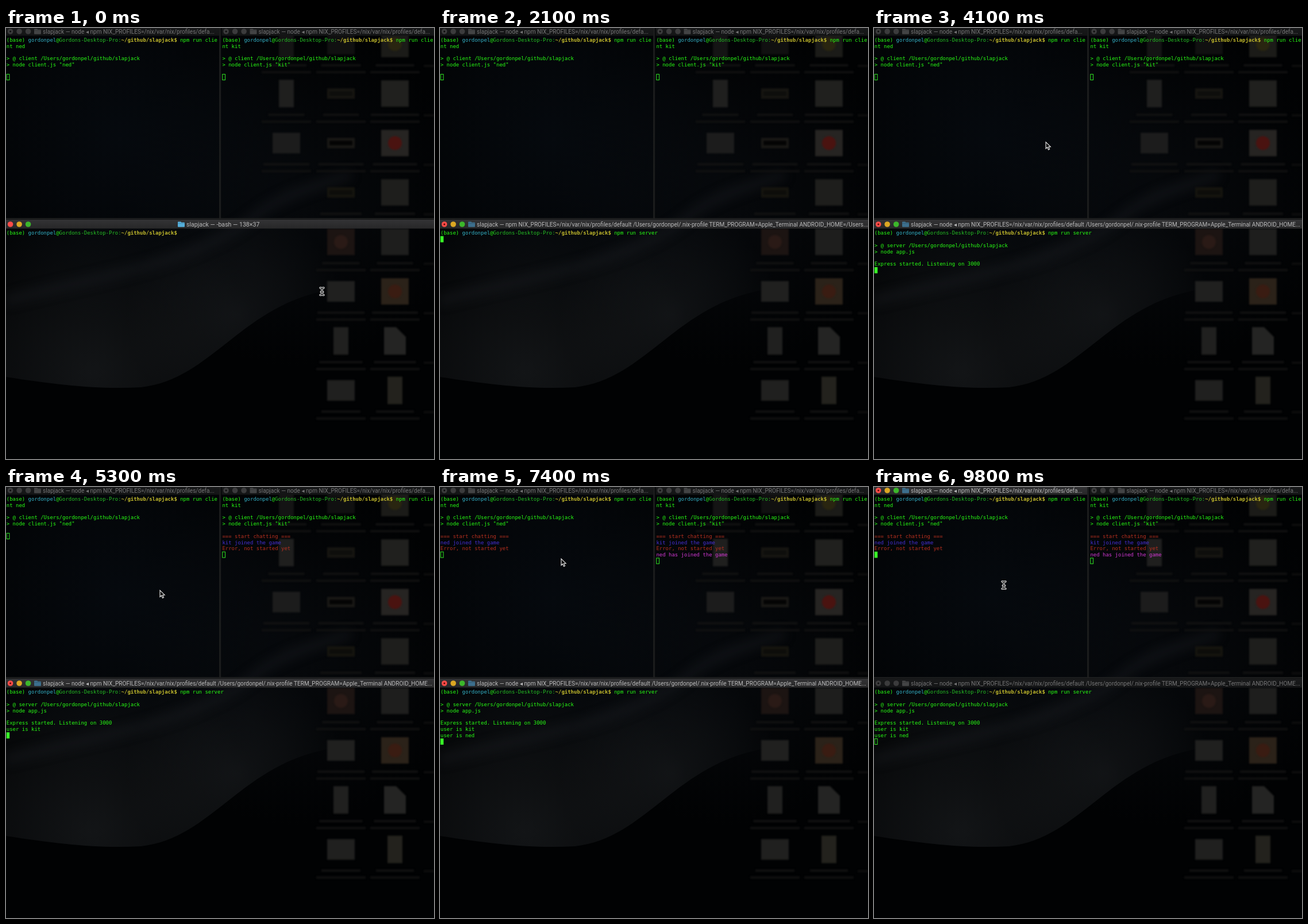
These frames come from a looping animation (745 px wide and 751 px high, 10 s). An HTML page with a canvas:

```html
<!DOCTYPE html>
<html lang="en">
<head>
<meta charset="utf-8">
<title>slapjack</title>
<style>
html, body { margin: 0; width: 100%; height: 100%; overflow: hidden; background: #010203; }
canvas { display: block; width: 745px; height: 751px; }
</style>
</head>
<body>
<canvas id="stage" width="745" height="751"></canvas>
<script>
const W = 745, H = 751, LOOP = 10000;
const ctx = document.getElementById('stage').getContext('2d');

const MONO = '"DejaVu Sans Mono", monospace';
const SANS = 'Roboto, "DejaVu Sans", sans-serif';
const SIZE = 8.97, CELL = 5.4, LINE = 10.8;
const C = {
  text: '#28fe14', cursor: '#38fe27', red: '#b8301f', blue: '#452fd2',
  pink: '#d338d3', cyan: '#33b0c4', green: '#25bc24', yellow: '#c3bb2c'
};

// When things happen, in ms
const TYPE = 1000, ENTER = 2000, NODE = 2300, LISTEN = 2600;
const RIGHT_JOIN = 4200, LEFT_JOIN = 7300, FOCUS = 7500;

const USER = 'gordonpel', HOST = 'Gordons-Desktop-Pro';
const LEFT = 'ned', RIGHT = 'kit';
const COMMAND = 'npm run server';
const PROFILES = 'npm NIX_PROFILES=/nix/var/nix/profiles/';
const CLIENT_TITLE = `slapjack — node ◂ ${PROFILES}defa...`;
const ENV = `${PROFILES}default /Users/${USER}/.nix-profile TERM_PROGRAM=Apple_Terminal ANDROID_HOME`;

function rect(g, x, y, w, h, fill) {
  g.fillStyle = fill;
  g.fillRect(x, y, w, h);
}

function disc(g, x, y, r, fill) {
  g.fillStyle = fill;
  g.beginPath();
  g.arc(x, y, r, 0, Math.PI * 2);
  g.fill();
}

function glow(g, x, y, r, rgb, alpha) {
  const fill = g.createRadialGradient(x, y, 0, x, y, r);
  fill.addColorStop(0, `rgba(${rgb},${alpha})`);
  fill.addColorStop(0.5, `rgba(${rgb},${alpha * 0.55})`);
  fill.addColorStop(1, `rgba(${rgb},0)`);
  rect(g, 0, 0, W, H, fill);
}

function dunes(g) {
  rect(g, 0, 0, W, H, '#010203');
  glow(g, 200, 190, 330, '12,20,30', 0.4);
  glow(g, 500, 290, 300, '14,18,24', 0.4);

  g.save();
  g.beginPath();
  g.moveTo(0, 608);
  g.bezierCurveTo(90, 622, 160, 630, 235, 626);
  g.bezierCurveTo(360, 612, 410, 480, 570, 455);
  g.lineTo(W, 425);
  g.lineTo(W, 350);
  g.lineTo(0, 350);
  g.clip();
  glow(g, 150, 600, 300, '36,39,42', 0.5);
  glow(g, 400, 500, 190, '34,37,40', 0.45);
  g.restore();

  g.save();
  g.filter = 'blur(9px)';
  g.strokeStyle = 'rgba(30,34,38,0.4)';
  g.lineWidth = 16;
  g.beginPath();
  g.moveTo(0, 475);
  g.bezierCurveTo(170, 430, 330, 410, 430, 330);
  g.bezierCurveTo(480, 290, 530, 280, 600, 255);
  g.stroke();
  g.restore();
}

// Icon shapes: width, height
const BOX = [48, 46], WIDE = [48, 36], TALL = [26, 48], STRIP = [48, 18], SHEET = [38, 48];

// column x, rows from the top: shape, colour, centre colour
const FILES = {
  488: [[TALL, '#141414'], [TALL, '#1f1f1e'], [WIDE, '#1c1c1c']],
  583: [
    [WIDE, '#101010'], [STRIP, '#171612', '#0e0e0c'], [STRIP, '#1a1916', '#040404'],
    [STRIP, '#16150f', '#0d0d0a'], [BOX, '#1c1412', '#2a1a16'], [WIDE, '#20201f'],
    [TALL, '#20201f'], [WIDE, '#20201f']
  ],
  677: [
    [BOX, '#1b1b18', '#292510'], [BOX, '#20201e'], [BOX, '#262422', '#4a1310'],
    [BOX, '#1e1e1c'], [BOX, '#1e1e1d'], [BOX, '#2b2219', '#3a1c12'],
    [SHEET, '#242423'], [TALL, '#23221d']
  ]
};

function icon(g, x, y, shape, fill, centre) {
  const [w, h] = shape, r = x + w / 2, b = y + h / 2, fold = shape === SHEET ? 17 : 0;
  g.fillStyle = fill;
  g.beginPath();
  g.moveTo(x - w / 2, y - h / 2);
  g.lineTo(r - fold, y - h / 2);
  g.lineTo(r, y - h / 2 + fold);
  g.lineTo(r, b);
  g.lineTo(x - w / 2, b);
  g.fill();
  if (!centre) return;
  if (shape === STRIP) rect(g, x - 20, y - 4, 40, 8, centre);
  else disc(g, x, y, 12, centre);
}

function desktop(g) {
  g.save();
  g.filter = 'blur(1.8px)';
  for (const [key, files] of Object.entries(FILES)) {
    const x = Number(key);
    files.forEach((file, row) => {
      const y = 28 + row * 86.2;
      const label = 62 + (row * 17 + x) % 24;
      icon(g, x, y, ...file);
      rect(g, x - label / 2, y + 35, label, 4, '#111111');
      rect(g, x - 43, y + 47, 86, 4, '#101010');
    });
  }
  for (let row = 0; row < 8; row++) rect(g, 727, 64 + row * 86.2, 18, 4, '#0d0d0d');
  g.restore();
}

const backdrop = document.createElement('canvas');
backdrop.width = W;
backdrop.height = H;
dunes(backdrop.getContext('2d'));
desktop(backdrop.getContext('2d'));

function folder(x, y, fill) {
  ctx.fillStyle = fill;
  ctx.beginPath();
  ctx.roundRect(x, y - 4.5, 6, 4, 1);
  ctx.roundRect(x, y - 3.3, 12, 8, 1);
  ctx.fill();
  rect(ctx, x, y - 2, 12, 0.7, 'rgba(0,0,0,0.25)');
}

function titleBar(x, y, w, title, active, busy = true) {
  const cy = y + 8;
  const fill = ctx.createLinearGradient(0, y, 0, y + 16);
  fill.addColorStop(0, active ? '#333335' : '#191a1b');
  fill.addColorStop(1, active ? '#272728' : '#131415');
  rect(ctx, x, y, w, 15.5, fill);
  const lights = active ? ['#fc4c48', '#dca723', '#3cb62b'] : ['#3b3b3c', '#3b3b3c', '#3b3b3c'];
  lights.forEach((c, i) => disc(ctx, x + 7.6 + i * 15.5, cy, 4.8, c));
  if (busy) disc(ctx, x + 7.6, cy, 1.5, active ? '#5c0806' : '#0c0c0c');
  folder(x + (busy ? 49 : 299), cy, busy ? (active ? '#3d6f8d' : '#434445') : '#55aeda');
  ctx.font = `${busy ? 10.1 : 10.6}px ${SANS}`;
  ctx.fillStyle = active ? '#b9b9ba' : '#757576';
  ctx.fillText(title, x + (busy ? 64 : 314), cy + 3.7);
}

function write(x, y, row, col, str, fill = C.text, bold = false) {
  ctx.font = `${bold ? 'bold ' : ''}${SIZE}px ${MONO}`;
  ctx.fillStyle = fill;
  ctx.fillText(str, x + col * CELL, y + row * LINE + 3.2);
}

function prompt(x, y, command) {
  let col = 0;
  const parts = [
    ['(base) '], [USER, C.cyan], ['@'], [HOST, C.green], [':', C.green],
    ['~/github/slapjack$', C.yellow, true], [' ' + command]
  ];
  for (const [str, fill, bold] of parts) {
    write(x, y, 0, col, str, fill, bold);
    col += str.length;
  }
  return col;
}

function caret(x, y, row, col, solid) {
  const left = x + col * CELL, top = y + row * LINE - 5.4;
  if (solid) {
    rect(ctx, left, top, 5.4, 10.8, C.cursor);
  } else {
    ctx.strokeStyle = C.cursor;
    ctx.lineWidth = 0.9;
    ctx.strokeRect(left + 0.4, top + 0.4, 4.7, 10);
  }
}

function client(x, name, lines, active) {
  const y = 20.8;
  titleBar(x < 10 ? 0 : 375.5, -2, x < 10 ? 371 : 370, CLIENT_TITLE, active);
  prompt(x, y, 'npm run clie');
  write(x, y, 1, 0, 'nt ' + name);
  write(x, y, 3, 0, `> @ client /Users/${USER}/github/slapjack`);
  write(x, y, 4, 0, `> node client.js "${name}"`);
  lines.forEach(([str, fill], i) => write(x, y, 6 + i, 0, str, fill));
  caret(x, y, 6 + lines.length, 0, active);
}

function joined(name) {
  return [
    ['=== start chatting ===', C.red],
    [name + ' joined the game', C.blue],
    ['Error, not started yet', C.red]
  ];
}

function server(t) {
  const x = 0.8, y = 357.2, active = t < FOCUS;
  let title = 'slapjack — -bash — 138×37';
  if (t >= LISTEN) title = `slapjack — node ◂ ${ENV}...`;
  else if (t >= ENTER) title = `slapjack — ${ENV}=/Users...`;
  titleBar(0, 334, W, title, active, t >= ENTER);

  const share = Math.max(0, Math.min(1, (t - TYPE + 100) / 900));
  const col = prompt(x, y, COMMAND.slice(0, Math.round(share * COMMAND.length)));
  if (t < TYPE) return;
  if (t < ENTER) return caret(x, y, 0, col, true);

  let row = 1;
  if (t >= NODE) {
    write(x, y, 2, 0, `> @ server /Users/${USER}/github/slapjack`);
    write(x, y, 3, 0, '> node app.js');
    row = 5;
  }
  if (t >= LISTEN) write(x, y, row++, 0, 'Express started. Listening on 3000');
  if (t >= RIGHT_JOIN) write(x, y, row++, 0, 'user is ' + RIGHT);
  if (t >= LEFT_JOIN) write(x, y, row++, 0, 'user is ' + LEFT);
  caret(x, y, row, 0, active);
}

// time, x, y of the pointer's hot spot
const PATH = [
  [2700, 550, 459], [3000, 397, 261], [3900, 310, 205], [4500, 268, 181], [5300, 268, 180],
  [6600, 251, 145], [7400, 211, 125], [7900, 211, 125], [9800, 226, 171]
];

function pointerAt(t) {
  if (t < TYPE) return [550, 459];
  if (t < PATH[0][0]) return null;
  const i = PATH.findIndex(p => p[0] > t);
  if (i < 0) return PATH[PATH.length - 1].slice(1);
  const [t0, x0, y0] = PATH[i - 1], [t1, x1, y1] = PATH[i];
  const k = (t - t0) / (t1 - t0), e = k * k * (3 - 2 * k);
  return [x0 + (x1 - x0) * e, y0 + (y1 - y0) * e];
}

function beam(x, y) {
  const shape = new Path2D();
  for (const s of [-1, 1]) {
    shape.moveTo(x - 3, y + s * 6.3);
    shape.quadraticCurveTo(x, y + s * 6.3, x, y + s * 4);
    shape.quadraticCurveTo(x, y + s * 6.3, x + 3, y + s * 6.3);
  }
  shape.moveTo(x, y - 4.5);
  shape.lineTo(x, y + 4.5);
  shape.moveTo(x - 1.8, y + 1);
  shape.lineTo(x + 1.8, y + 1);
  ctx.lineCap = 'round';
  for (const [width, stroke] of [[3.4, '#e6e6e6'], [1.2, '#111111']]) {
    ctx.lineWidth = width;
    ctx.strokeStyle = stroke;
    ctx.stroke(shape);
  }
  ctx.lineCap = 'butt';
}

function arrow(x, y) {
  ctx.beginPath();
  ctx.moveTo(x, y);
  for (const [dx, dy] of [[0, 11.4], [2.6, 9], [4.5, 13.4], [6.5, 12.5], [4.6, 8.3], [8.2, 8.2]]) {
    ctx.lineTo(x + dx, y + dy);
  }
  ctx.closePath();
  ctx.fillStyle = '#0a0a0a';
  ctx.fill();
  ctx.lineWidth = 1.1;
  ctx.strokeStyle = '#f0f0f0';
  ctx.stroke();
}

function draw(t) {
  ctx.drawImage(backdrop, 0, 0);
  rect(ctx, 371, 0, 3.2, 333, '#1b1c1c');
  rect(ctx, 0, 331.3, W, 2.2, '#202121');

  client(0.8, LEFT, t >= LEFT_JOIN ? joined(LEFT) : [], t >= FOCUS);
  const news = t >= RIGHT_JOIN ? joined(RIGHT) : [];
  if (t >= LEFT_JOIN) news.push([LEFT + ' has joined the game', C.pink]);
  client(376.4, RIGHT, news, false);
  server(t);

  const at = pointerAt(t);
  if (!at) return;
  const overFocused = t >= FOCUS || at[1] > 350;
  (overFocused ? beam : arrow)(at[0], at[1]);
}

const start = performance.now();
function tick() {
  const t = (performance.now() - start) % LOOP;
  draw(Math.floor(t / 100) * 100);
  requestAnimationFrame(tick);
}
tick();
</script>
</body>
</html>
```
